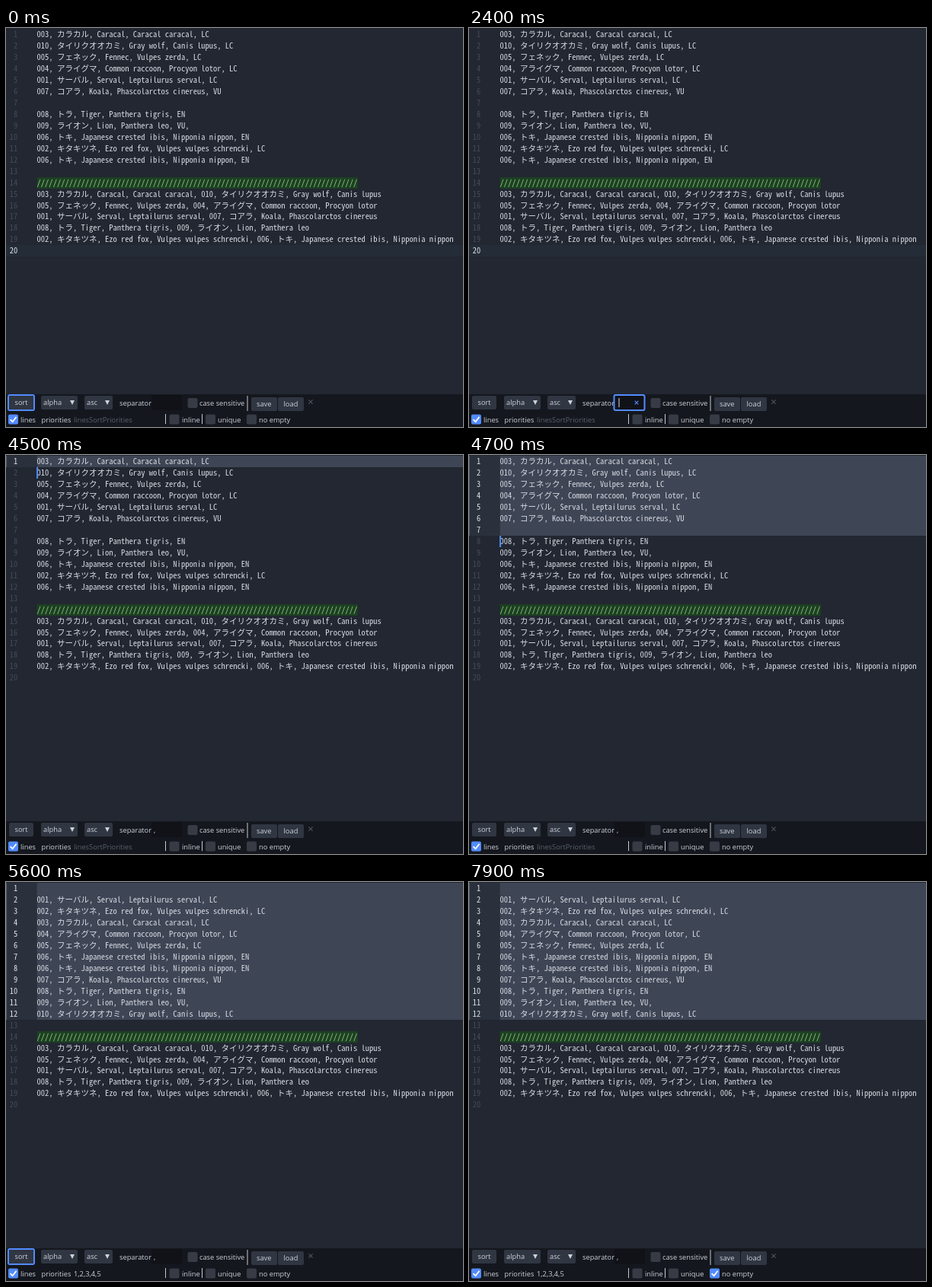
Write an HTML page that moves like this. It is 600 px wide and 524 px high and loops after 8000 ms.

```html
<!DOCTYPE html>
<html lang="en">
<head>
<meta charset="utf-8">
<title>Sorting lines</title>
<style>
html, body { margin: 0; width: 100%; height: 100%; overflow: hidden; background: #222731; }
svg { display: block; width: 600px; height: 524px; }
.code text { font: 10.53px "Noto Sans Mono CJK JP", "Noto Sans CJK JP", "Noto Sans Mono", monospace; white-space: pre; }
.ui text { font: 9.3px "Open Sans", "Noto Sans", sans-serif; fill: #cdd1d9; white-space: pre; }
</style>
</head>
<body>
<svg id="stage" viewBox="0 0 600 524" xmlns="http://www.w3.org/2000/svg">
  <rect width="600" height="524" fill="#222731"/>
  <g class="code" id="code"></g>
  <g class="ui" id="ui"></g>
</svg>
<script>
const LOOP = 8000, TOP = 1.4, ROW = 14.94, LEFT = 40.6, CELL = 5.265;
const BLUE = "#528bff", OFF = "#363b45";

const animals = [
  "001, サーバル, Serval, Leptailurus serval, LC",
  "002, キタキツネ, Ezo red fox, Vulpes vulpes schrencki, LC",
  "003, カラカル, Caracal, Caracal caracal, LC",
  "004, アライグマ, Common raccoon, Procyon lotor, LC",
  "005, フェネック, Fennec, Vulpes zerda, LC",
  "006, トキ, Japanese crested ibis, Nipponia nippon, EN",
  "007, コアラ, Koala, Phascolarctos cinereus, VU",
  "008, トラ, Tiger, Panthera tigris, EN",
  "009, ライオン, Lion, Panthera leo, VU,",
  "010, タイリクオオカミ, Gray wolf, Canis lupus, LC"
];
const pick = ids => ids.map(id => id ? animals[id - 1] : "");
const short = id => animals[id - 1].replace(/, (LC|EN|VU),?$/, "");
const before = pick([3, 10, 5, 4, 1, 7, 0, 8, 9, 6, 2, 6]);
const after = pick([0, 1, 2, 3, 4, 5, 6, 6, 7, 8, 9, 10]);
const pairs = [[3, 10], [5, 4], [1, 7], [8, 9], [2, 6]].map(p => p.map(short).join(", "));
const tail = ["", "/".repeat(80), ...pairs, ""];

const code = document.getElementById("code");
const ui = document.getElementById("ui");

function set(el, attrs) {
  for (const k in attrs) el.setAttribute(k, attrs[k]);
}
function add(parent, tag, attrs, text) {
  const el = document.createElementNS("http://www.w3.org/2000/svg", tag);
  set(el, attrs);
  if (text !== undefined) el.textContent = text;
  parent.appendChild(el);
  return el;
}
function box(parent, x, y, width, height, fill, rx = 0) {
  return add(parent, "rect", { x, y, width, height, fill, rx });
}
const show = (el, on) => el.setAttribute("visibility", on ? "visible" : "hidden");
const rowY = n => Math.round(TOP + (n - 1) * ROW);

// Editor
const current = box(code, 0, 0, 600, 15, "#242d37");
const gutter = box(code, 0, 1, LEFT, 0, "#2b313c");
const edge = box(code, 0, 1, 1, 0, "#596170");
const selection = box(code, LEFT, 1, 600 - LEFT, 0, "#3e4555");
box(code, LEFT, rowY(14), 80 * CELL, 15, "#1d4023");
const numbers = [], lines = [];
for (let n = 1; n <= 20; n++) {
  const y = TOP + (n - 1) * ROW + 11;
  numbers.push(add(code, "text", { x: 15.2, y, "text-anchor": "end" }, n));
  lines.push(add(code, "text", { x: LEFT, y, fill: n === 14 ? "#a6e88c" : "#d8dce4" }));
}
const caret = box(code, 0, 0, 2, 15, BLUE);

// Panel
const label = (x, y, text) => add(ui, "text", { x, y }, text);
function button(x, y, w, h, text, tx) {
  box(ui, x, y, w, h, "#303642", 2);
  label(tx, y + h / 2 + 3.4, text);
}
function select(x, w, text) {
  button(x, 483, w, 18, text, x + 3);
  add(ui, "path", { d: `M${x + w - 10} 489h6l-3 6z`, fill: "#cdd1d9" });
}
function check(x, y, text, tx) {
  const fill = box(ui, x, y, 13, 13, OFF, 2);
  const mark = add(ui, "path", {
    d: `M${x + 2.6} ${y + 6.6}l3 3 5-6.4`, fill: "none", stroke: "#fff", "stroke-width": 1.8
  });
  label(tx, y + 10.2, text);
  const toggle = on => {
    set(fill, { fill: on ? BLUE : OFF });
    show(mark, on);
  };
  toggle(false);
  return toggle;
}
function ring(x, y, w, h) {
  return add(ui, "rect", { x, y, width: w, height: h, rx: 2, fill: "none", stroke: BLUE, "stroke-width": 2 });
}
const cross = (x, y, r, stroke) =>
  add(ui, "path", { d: `M${x - r} ${y - r}l${2 * r} ${2 * r}m0 ${-2 * r}l${-2 * r} ${2 * r}`, stroke, "stroke-width": 1.2 });

box(ui, 0, 481, 600, 43, "#14171d");
button(4, 483, 32, 18, "sort", 11.5);
select(46, 48, "alpha");
select(103, 37, "asc");
label(149, 495.6, "separator");
box(ui, 191, 482, 40, 20, "#101218", 2);
const comma = label(194, 495.6, ",");
check(238.5, 486, "case sensitive", 254);
box(ui, 316.5, 483, 1, 20, "#c4c8d0");
button(322, 485, 34, 18, "save", 329);
button(357, 485, 34, 18, "load", 364.5);
cross(400, 491, 2.6, "#4d535e");
check(3, 507.5, "lines", 19)(true);
label(46.5, 517.7, "priorities");
const priorities = label(89, 517.7, "");
box(ui, 209, 507, 1, 13, "#c4c8d0");
check(214.5, 507.5, "inline", 231);
box(ui, 257, 507, 1, 13, "#c4c8d0");
check(262, 507.5, "unique", 278);
const setNoEmpty = check(316, 507.5, "no empty", 332);

const sortRing = ring(3, 482, 34, 20);
const sepRing = ring(190.5, 482, 40, 20);
const sepCaret = box(ui, 196.5, 486, 1, 12, "#d5d8de");
const clear = cross(220, 492, 2.3, BLUE);
const prioRing = ring(87, 506, 118, 16);

function cursorAt(t) {
  if (t < 3800) return { row: 20 };
  if (t < 4200) return { row: 11, col: 29, caret: true };
  if (t < 4500) return { row: 1, col: 0, caret: true };
  const count = Math.min(12, 1 + 3 * Math.floor((t - 4500) / 100));
  return { count, row: count + 1, col: 0, caret: t < 5000 };
}

function draw(t) {
  const sorted = t >= 5500;
  [...(sorted ? after : before), ...tail].forEach((s, i) => {
    if (lines[i].textContent !== s) lines[i].textContent = s;
  });

  const { row, col = 0, count = 0, caret: visible = false } = cursorAt(t);
  const height = count ? rowY(count + 1) - 1 : 0;
  show(current, !count);
  set(current, { y: rowY(row) });
  for (const el of [gutter, edge, selection]) set(el, { height });
  numbers.forEach((el, i) => {
    const active = count ? i < count : i + 1 === row;
    set(el, { fill: active ? "#dde1e8" : "#444b58" });
  });
  show(caret, visible);
  set(caret, { x: LEFT + col * CELL - 0.5, y: rowY(row) });

  const inSep = t >= 2000 && t < 3800;
  const typed = t >= 3000;
  show(sortRing, t < 2000 || (t >= 5500 && t < 6900));
  show(sepRing, inSep);
  show(clear, inSep);
  show(sepCaret, inSep && (t - 2000) % 1000 < 500);
  set(sepCaret, { x: typed ? 199.5 : 196.5 });
  show(comma, typed);
  set(comma, { x: inSep ? 196 : 194 });

  const filled = t >= 5100;
  const keys = 2 * Math.floor((t - 5000) / 100) + 1;
  const text = filled ? "1,2,3,4,5".slice(0, keys) : "linesSortPriorities";
  if (priorities.textContent !== text) priorities.textContent = text;
  priorities.style.fill = filled ? "#cdd1d9" : "#59606c";
  show(prioRing, t >= 5000 && t < 5500);
  setNoEmpty(t >= 6900);
}

const start = performance.now();
function tick(now) {
  draw(Math.max(0, now - start) % LOOP);
  requestAnimationFrame(tick);
}
draw(0);
requestAnimationFrame(tick);
</script>
</body>
</html>
```
